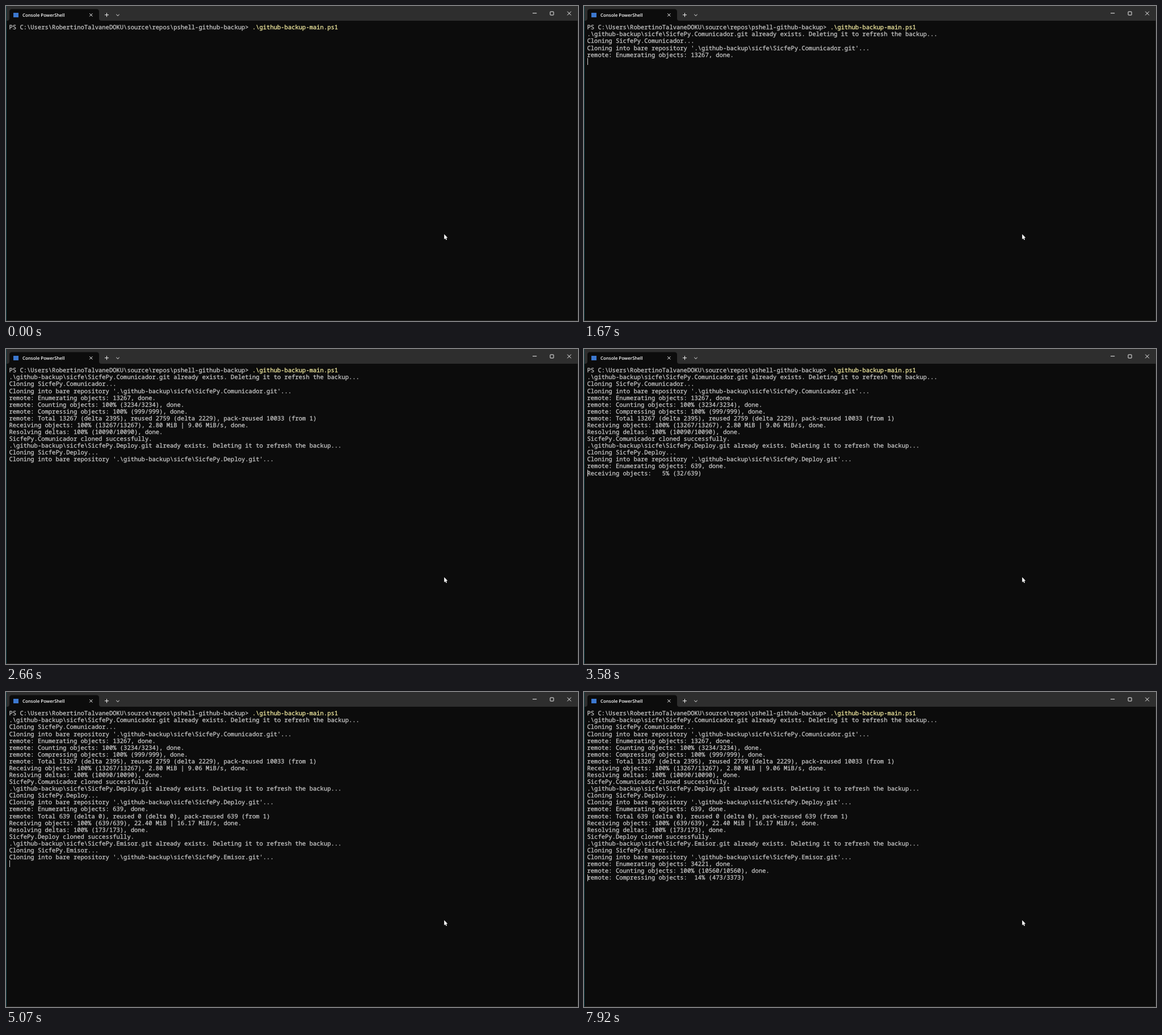
Animation, 1008 px wide and 556 px high, one loop 8000 ms. Source, as an HTML page:

```html
<!DOCTYPE html>
<html lang="en">
<head>
<meta charset="utf-8">
<title>Terminal backup run</title>
<style>
  html, body { margin: 0; width: 100%; height: 100%; overflow: hidden; background: #0c0c0c; }
  svg { display: block; width: 100vw; height: 100vh; }
  text { white-space: pre; text-rendering: geometricPrecision; }
  #screen text { font: 10.5px "Noto Sans Mono", monospace; fill: #ccc; stroke: #ccc; stroke-width: 0.25; }
  #screen .command { fill: #f9f1a5; stroke: #f9f1a5; }
  .title { font: 600 7.9px "Open Sans", sans-serif; fill: #fff; }
  .controls { fill: none; stroke: #f2f2f2; stroke-width: 1; }
</style>
</head>
<body>
<svg viewBox="0 0 1008 556">
  <rect width="1008" height="556" fill="#0c0c0c"/>
  <rect width="1008" height="26" fill="#2e2e2e"/>
  <path d="M2 26Q6 26 6 22V10Q6 5.5 10.500 5.500H159.500Q164 5.500 164 10V22Q164 26 168 26Z" fill="#0c0c0c"/>
  <rect x="13" y="12" width="9" height="8" fill="#3c78cf"/>
  <text class="title" x="29" y="18.800">Console PowerShell</text>
  <g class="controls">
    <path d="M147.200 13.200l5.200 5.200m0-5.200l-5.200 5.200"/>
    <path d="M174 15.700h7m-3.500-3.500v7"/>
    <path d="M194.300 14.800l2.700 2.600 2.700-2.600"/>
    <path d="M928 12.700h7.200"/>
    <rect x="959" y="10" width="6" height="6" rx="0.600"/>
    <path d="M989.200 9.700l6.600 6.600m0-6.600l-6.600 6.600"/>
  </g>
  <path d="M0.500 0V556" stroke="#14464d"/>
  <path d="M0 555.500H1008" stroke="#2b2b29"/>
  <path d="M1007.500 26V556" stroke="#222"/>
  <g id="screen"></g>
  <rect id="caret" x="6" width="1" height="12" fill="#ccc"/>
  <path d="M772.200 402.800v8.900l2-1.800 1.300 3 1.500-.700-1.300-2.900h2.600z" fill="#fff"/>
</svg>
<script>
const LOOP = 8000, LEFT = 5.5, TOP = 31.7, PITCH = 12.08, BASELINE = 9.6;
const SVG = "http://www.w3.org/2000/svg";
const PROMPT = String.raw`PS C:\Users\RobertinoTalvaneDOKU\source\repos\pshell-github-backup> `;
const COMMAND = String.raw`.\github-backup-main.ps1`;

const opening = repo => {
  const path = String.raw`.\github-backup\sicfe\SicfePy.` + repo + ".git";
  return [
    `${path} already exists. Deleting it to refresh the backup...`,
    `Cloning SicfePy.${repo}...`,
    `Cloning into bare repository '${path}'...`
  ];
};

const finished = [
  PROMPT,
  ...opening("Comunicador"),
  "remote: Enumerating objects: 13267, done.",
  "remote: Counting objects: 100% (3234/3234), done.",
  "remote: Compressing objects: 100% (999/999), done.",
  "remote: Total 13267 (delta 2395), reused 2759 (delta 2229), pack-reused 10033 (from 1)",
  "Receiving objects: 100% (13267/13267), 2.80 MiB | 9.06 MiB/s, done.",
  "Resolving deltas: 100% (10090/10090), done.",
  "SicfePy.Comunicador cloned successfully.",
  ...opening("Deploy"),
  "remote: Enumerating objects: 639, done.",
  "remote: Total 639 (delta 0), reused 0 (delta 0), pack-reused 639 (from 1)",
  "Receiving objects: 100% (639/639), 22.40 MiB | 16.17 MiB/s, done.",
  "Resolving deltas: 100% (173/173), done.",
  "SicfePy.Deploy cloned successfully.",
  ...opening("Emisor"),
  "remote: Enumerating objects: 34221, done.",
  "remote: Counting objects: 100% (10560/10560), done."
];

const progress = (label, total) => (percent, rate = "", count = Math.ceil(total * percent / 100)) =>
  `${label}: ${String(percent).padStart(3)}% (${count}/${total})${rate}`;
const counting = progress("remote: Counting objects", 3234);
const compressing = progress("remote: Compressing objects", 999);
const receiving = progress("Receiving objects", 13267);
const resolving = progress("Resolving deltas", 10090);
const receivingDeploy = progress("Receiving objects", 639);
const countingEmisor = progress("remote: Counting objects", 10560);
const compressingEmisor = progress("remote: Compressing objects", 3373);

// [start time, finished rows, line in progress]
const output = [
  [0, 1, ""],
  [130, 2, ""],
  [200, 4, ""],
  [1670, 5, ""],
  [1730, 5, counting(47)],
  [1800, 6, compressing(31)],
  [1870, 7, receiving(8)],
  [1930, 7, receiving(42)],
  [2000, 7, receiving(79)],
  [2060, 9, resolving(37, "", 3735)],
  [2150, 12, ""],
  [2190, 14, ""],
  [3580, 15, receivingDeploy(5)],
  [3650, 15, receivingDeploy(16)],
  [3720, 15, receivingDeploy(24)],
  [3780, 15, receivingDeploy(31)],
  [4050, 15, receivingDeploy(38, ", 5.21 MiB | 9.87 MiB/s")],
  [4120, 15, receivingDeploy(43, ", 5.21 MiB | 9.87 MiB/s")],
  [4930, 15, receivingDeploy(82, ", 14.63 MiB | 14.02 MiB/s")],
  [5000, 19, ""],
  [5070, 22, ""],
  [6590, 23, ""],
  [6650, 23, countingEmisor(86)],
  [6720, 24, compressingEmisor(5)],
  [7250, 24, compressingEmisor(9)],
  [7780, 24, compressingEmisor(12)],
  [7850, 24, compressingEmisor(13)],
  [7920, 24, compressingEmisor(14)]
];
const caretOff = [[0, 130], [470, 1000], [1530, 1670], [2660, 3190], [4320, 4850],
  [5390, 5990], [6520, 6590], [7050, 7250], [7580, 7780]];

const screen = document.getElementById("screen");
const caret = document.getElementById("caret");

function addText(row) {
  const node = document.createElementNS(SVG, "text");
  node.setAttribute("x", LEFT);
  node.setAttribute("y", TOP + BASELINE + row * PITCH);
  return screen.appendChild(node);
}

const rows = Array.from({ length: finished.length + 1 }, (_, row) => addText(row));
rows[0].textContent = PROMPT;
const command = document.createElementNS(SVG, "tspan");
command.setAttribute("class", "command");
command.textContent = COMMAND;
rows[0].append(command);

let shown;
function draw(now) {
  const time = now % LOOP;
  const state = output.findLast(([start]) => start <= time);
  if (state !== shown) {
    const [, count, current] = shown = state;
    rows.forEach((node, row) => {
      if (row) node.textContent = row < count ? finished[row] : row === count ? current : "";
    });
    caret.setAttribute("y", Math.round(TOP + count * PITCH));
  }
  const hidden = caretOff.some(([from, to]) => time >= from && time < to);
  caret.setAttribute("visibility", hidden ? "hidden" : "visible");
  requestAnimationFrame(draw);
}
draw(0);
</script>
</body>
</html>
```
